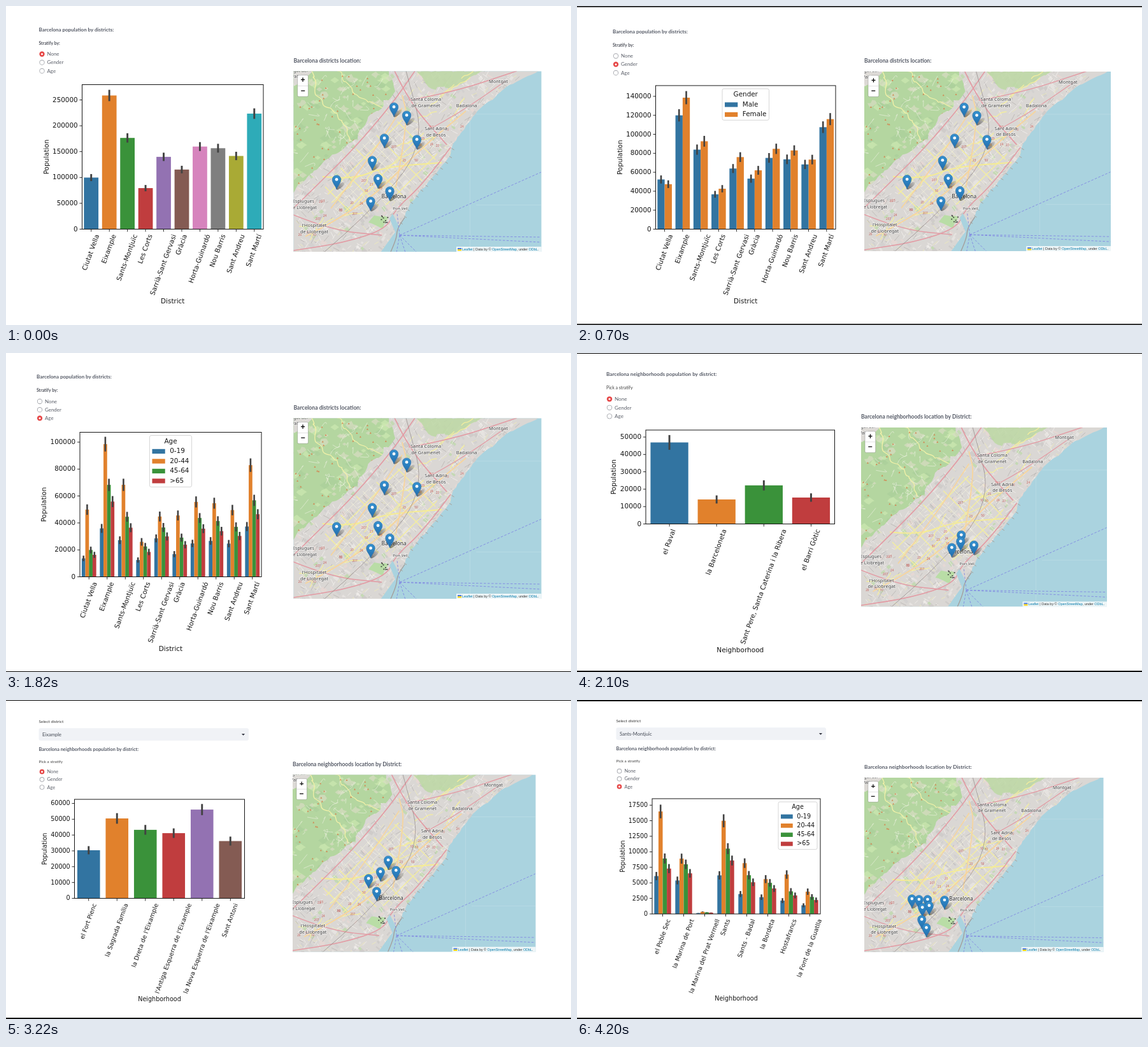
An HTML page with a canvas that plays this animation: 887 px wide and 501 px high, repeating every 4.9 s.

```html
<!DOCTYPE html>
<html lang="en">
<head>
<meta charset="utf-8">
<title>Barcelona population</title>
<style>
html, body { margin: 0; width: 100%; height: 100%; overflow: hidden; background: #fff; }
canvas { display: block; width: 887px; height: 501px; }
</style>
</head>
<body>
<canvas id="stage" width="887" height="501"></canvas>
<script>
const ctx = document.getElementById('stage').getContext('2d');
const HOLD = 700;
const PALETTE = ['#3274a1', '#e1812c', '#3a923a', '#c03d3e', '#9372b2',
  '#845b53', '#d684bd', '#7f7f7f', '#a9aa35', '#2eabb8'];
const PLOT = '"DejaVu Sans", sans-serif';
const PAGE = 'Lato, sans-serif';
const MAP = '"Noto Sans", sans-serif';
const ARIAL = '"Liberation Sans", Arial, sans-serif';
const INK = '#161616';
const STRATA = ['None', 'Gender', 'Age'];
const HUES = [[''], ['Male', 'Female'], ['0-19', '20-44', '45-64', '>65']];

// Total in thousands, then the shares of ages 0-19, ages 20-44 and women.
const place = (name, total, young = .15, adult = .36, women = .54) => ({ name, total, young, adult, women });

function split({ total, young, adult, women }, by) {
  const rest = 1 - young - adult;
  const shares = [[1], [1 - women, women], [young, adult, rest * .55, rest * .45]][by];
  return shares.map(share => share * total);
}

const districts = [
  place('Ciutat Vella', 99.8, .137, .5, .475),
  place('Eixample', 258.6, .139, .381, .536),
  place('Sants-Montjuïc', 176.5, .154, .387, .525),
  place('Les Corts', 79.4, .157, .327, .537),
  place('Sarrià-Sant Gervasi', 139.9, .204, .32, .543),
  place('Gràcia', 115.3, .146, .395, .538),
  place('Horta-Guinardó', 159.8, .155, .348, .53),
  place('Nou Barris', 156.6, .17, .349, .53),
  place('Sant Andreu', 141.6, .174, .35, .518),
  place('Sant Martí', 223.5, .167, .371, .519)
];
const districtPins = [[609, 159], [629, 172], [594, 208], [645, 210], [575, 243], [519, 273],
  [584, 271.5], [602.5, 291], [572.5, 307]];

// `unit` is the height in pixels of one tick step; `spread` sets the error bars.
const districtScene = { places: districts, pins: districtPins, font: 10.4, size: 7.95, legend: .5 };
const hoodScene = { hood: true, font: 9.6, size: 7.35, spread: .47 };
const scenes = [
  { ...districtScene, by: 0, x: 51.5, title: 37.5, box: [119.5, 123.5, 404, 350.5],
    step: 50, unit: 40.6, spread: .68, map: [451.5, 102.5, 389] },
  { ...districtScene, by: 1, x: 56, title: 40.5, box: [123.5, 125, 406, 350.5],
    step: 20, unit: 29.8, spread: .59, map: [451, 103, 387], edges: ['#333', 2, 2] },
  { ...districtScene, by: 2, x: 48, title: 38, box: [116, 124.5, 401, 351.5],
    step: 20, unit: 42.3, spread: .55, map: [451.5, 102.5, 389], edges: ['#000', 0, 1] },
  { ...hoodScene, by: 0, x: 46, title: 33.5, size: 8.13, box: [108, 121, 404.5, 268.5], font: 10.5,
    step: 10, unit: 27.3, spread: .62, map: [446, 117, 386], edges: ['#000', 1, 2],
    places: [place('el Raval', 46.9), place('la Barceloneta', 14.1),
      place('Sant Pere, Santa Caterina i la Ribera', 22.2), place('el Barri Gòtic', 15.2)],
    pins: [[610, 273], [609, 283], [595, 293], [630, 289]] },
  { ...hoodScene, by: 0, x: 51.5, title: 77.5, select: 'Eixample', box: [107.5, 156, 374.5, 311.5],
    step: 10, unit: 24.85, map: [450, 117.5, 381.5], edges: ['#000', 1, 2],
    places: [place('el Fort Pienc', 30.4), place('la Sagrada Família', 50.5), place("la Dreta de l'Eixample", 43.3),
      place("l'Antiga Esquerra de l'Eixample", 41.2), place("la Nova Esquerra de l'Eixample", 56.1),
      place('Sant Antoni', 36.2)],
    pins: [[604.5, 239.5], [592, 258], [617, 256], [573, 269], [586, 289.5]] },
  { ...hoodScene, by: 1, x: 53.5, title: 71.5, select: 'Gràcia', box: [110, 153.5, 378.5, 289], legend: 0,
    step: 5, unit: 22.4, map: [448, 120, 379.7], edges: ['#000', 0, 0, 1],
    places: [place('Vallcarca i els Penitents', 15.3), place("el Camp d'en Grassot i Gràcia Nova", 33.4),
      place('el Coll', 7.15), place('la Salut', 12.9), place('la Vila de Gràcia', 49.4)],
    pins: [[687, 157], [551.5, 215], [577, 242], [593, 239]] },
  { ...hoodScene, by: 2, x: 61.5, title: 76.5, select: 'Sants-Montjuïc', box: [118, 155, 382, 336], legend: 1,
    step: 2.5, unit: 24.4, spread: .27, map: [451, 122, 375.5], edges: ['#000', 2, 2],
    places: [place('el Poble Sec', 38.8, .157, .425), place('la Marina de Port', 28.8, .187, .309),
      place('la Marina del Prat Vermell', .95), place('Sants', 40.3, .154, .372), place('Sants - Badal', 22.7, .141),
      place('la Bordeta', 17.4, .155, .322), place('Hostafrancs', 15.1, .142, .42), place('la Font de la Guatlla', 9.95, .14)],
    pins: [[529, 300], [540.5, 301], [554.5, 301], [582, 302], [546, 314], [557, 311], [545, 333.5], [552.5, 347]] }
];

function rect(x, y, w, h, color) {
  ctx.fillStyle = color;
  ctx.fillRect(x, y, w, h);
}

function panel(x, y, w, h, r, fill, line) {
  ctx.beginPath();
  ctx.roundRect(x, y, w, h, r);
  ctx.fillStyle = fill;
  ctx.fill();
  if (line) { ctx.strokeStyle = line; ctx.lineWidth = .8; ctx.stroke(); }
}

function setFont(size, family, weight = 400) {
  ctx.font = `${weight} ${size}px ${family}`;
}

function text(str, x, y, size, family, color = INK, align = 'left', weight) {
  setFont(size, family, weight);
  ctx.fillStyle = color;
  ctx.textAlign = align;
  ctx.textBaseline = 'middle';
  ctx.fillText(str, x, y);
}

function turnedText(str, x, y, angle, size) {
  ctx.save();
  ctx.translate(x, y);
  ctx.rotate(-angle);
  text(str, 0, 0, size, PLOT, INK, 'center');
  ctx.restore();
}

function disc(x, y, r, color) {
  ctx.beginPath();
  ctx.arc(x, y, r, 0, 7);
  ctx.fillStyle = color;
  ctx.fill();
}

function trace(points) {
  ctx.beginPath();
  points.forEach(([x, y]) => ctx.lineTo(x, y));
}

function road(points, color, width) {
  ctx.beginPath();
  ctx.moveTo(...points[0]);
  points.slice(1, -1).forEach(([x, y], i) => {
    const [nx, ny] = points[i + 2];
    ctx.quadraticCurveTo(x, y, (x + nx) / 2, (y + ny) / 2);
  });
  ctx.lineTo(...points[points.length - 1]);
  ctx.strokeStyle = color;
  ctx.lineWidth = width;
  ctx.stroke();
}

function area(points, color) {
  trace(points);
  ctx.fillStyle = color;
  ctx.fill();
}

function inside(points, draw) {
  ctx.save();
  trace(points);
  ctx.clip();
  draw();
  ctx.restore();
}

function randomizer(seed) {
  return (lo = 0, hi = 1) => {
    seed = (seed * 1664525 + 1013904223) % 4294967296;
    return lo + (hi - lo) * seed / 4294967296;
  };
}

// Breaks each segment of a line into small jittered steps.
function rough(points, amount, seed) {
  const rnd = randomizer(seed);
  return points.flatMap(([x, y], i) => {
    const [nx, ny] = points[i + 1] || [x, y];
    const n = Math.max(1, Math.round(Math.hypot(nx - x, ny - y) / 6));
    return Array.from({ length: n }, (_, k) => {
      const j = k ? amount : 0;
      return [x + (nx - x) * k / n + rnd(-j, j), y + (ny - y) * k / n + rnd(-j, j)];
    });
  });
}

function drawControls({ x, title, size, by, select, hood }) {
  if (select) {
    const y = title - 33.3, w = 329.5, caret = x + w - 8.5;
    text('Select district', x, title - 43, 6.5, PAGE, '#333');
    panel(x, y, w, 19.5, 3, '#f0f2f6');
    text(select, x + 5.5, y + 10, 7.6, PAGE, '#444a55');
    area([[caret - 2.6, y + 8.7], [caret + 2.6, y + 8.7], [caret, y + 11.6]], '#31333f');
  }
  const heading = hood ? 'Barcelona neighborhoods population by district:' : 'Barcelona population by districts:';
  text(heading, x, title, size, PAGE, '#555a66', 'left', 700);
  const subY = title + 2.64 * size;
  if (hood) text('Pick a stratify', x, subY, size * .86, PAGE, '#444');
  else text('Stratify by:', x, subY, size * .86, PAGE, '#50535c', 'left', 700);
  STRATA.forEach((name, i) => {
    const y = title + size * (4.78 + 1.66 * i), r = size * .52, on = i === by;
    disc(x + 5, y, r, on ? '#e64848' : '#a2a4aa');
    disc(x + 5, y, on ? 1.5 : r - .9, '#fff');
    text(name, x + 13, y + .3, size, PAGE, '#5c606a');
  });
}

function drawLegend({ legend, by, font, box: [left, top, right] }) {
  const hues = HUES[by];
  setFont(font, PLOT);
  const w = font * 3.45 + Math.max(...hues.map(hue => ctx.measureText(hue).width));
  const h = font * (1.7 + 1.52 * hues.length);
  const x = left + 5 + legend * (right - left - 10 - w), y = top + 5;
  panel(x, y, w, h, 2.5, 'rgba(255,255,255,.9)', '#ccc');
  text(STRATA[by], x + w / 2, y + font * .9, font, PLOT, INK, 'center');
  hues.forEach((hue, i) => {
    const cy = y + font * (2.4 + 1.49 * i);
    rect(x + 4, cy - font * .35, font * 1.95, font * .7, PALETTE[i]);
    text(hue, x + font * 3.05, cy, font, PLOT);
  });
}

function drawChart(s) {
  const [left, top, right, bottom] = s.box, { font, places, by } = s;
  const count = HUES[by].length;
  const slot = (right - left) / places.length, bar = slot * .8 / count;
  const scale = s.unit / s.step, lw = by ? 2.6 : 2.9;
  const tilt = 70 * Math.PI / 180;
  let labelsEnd = 0;

  places.forEach((p, group) => {
    const start = left + slot * (group + .1), mid = left + slot * (group + .5);
    split(p, by).forEach((v, k) => {
      const x = start + bar * k, err = s.spread * Math.sqrt(v) * Math.min(1, v);
      rect(x, bottom - v * scale, bar, v * scale, PALETTE[by ? k : group]);
      rect(x + bar / 2 - lw / 2, bottom - (v + err) * scale, lw, 2 * err * scale, '#424242');
    });
    rect(mid - .45, bottom, .9, 4, INK);
    setFont(font, PLOT);
    const tall = ctx.measureText(p.name).width * Math.sin(tilt) + font * Math.cos(tilt);
    turnedText(p.name, mid, bottom + 7 + tall / 2, tilt, font);
    labelsEnd = Math.max(labelsEnd, bottom + 7 + tall);
  });

  ctx.strokeStyle = INK;
  ctx.lineWidth = 1;
  ctx.strokeRect(left, top, right - left, bottom - top);
  let tickWidth = 0;
  for (let i = 0; i * s.unit < bottom - top; i++) {
    const y = bottom - i * s.unit, label = String(i * s.step * 1000);
    rect(left - 4, y - .45, 4, .9, INK);
    text(label, left - 6.8, y + .4, font, PLOT, INK, 'right');
    tickWidth = Math.max(tickWidth, ctx.measureText(label).width);
  }
  turnedText('Population', left - tickWidth - 6.8 - font * .88, (top + bottom) / 2, Math.PI / 2, font);
  text(s.hood ? 'Neighborhood' : 'District', (left + right) / 2, labelsEnd + font * .8, font, PLOT, INK, 'center');
  if (by) drawLegend(s);
}

const COAST = [[836, 102], [790, 124], [740, 165], [702, 216], [697, 236], [668, 271], [636, 308], [617, 346]];
const LAND = [...rough(COAST, 1.1, 3), [607, 326], [602, 334], [611, 355], [588, 387], [451, 387], [451, 102]];
const FOREST = [...rough([[601, 102], [611, 134], [567, 180], [552, 208], [508, 238], [472, 270], [451, 294]], 3, 8), [451, 102]];
const HILLS = rough([[644, 102], [750, 102], [701, 128], [668, 130], [644, 102]], 2.5, 4);

function drawCity() {
  const rnd = randomizer(11);
  const tones = ['#cfccca', '#e6e3e0', '#d3d1d0', '#e5d8d4', '#c4d9b4'];
  rect(451, 102, 390, 285, '#dad7d4');
  for (let i = 0; i < 620; i++) {
    ctx.save();
    ctx.translate(rnd(451, 800), rnd(102, 387));
    ctx.rotate(Math.PI / 4 + rnd(-.3, .3));
    rect(0, 0, rnd(2, 9), rnd(2, 7), tones[Math.floor(rnd(0, 4.5))]);
    ctx.restore();
  }
  for (let i = 0; i < 1200; i++) {
    const x = rnd(451, 800), y = rnd(102, 387), d = rnd(3, 12);
    const a = (rnd() < .5 ? .78 : -.78) + rnd(-.35, .35);
    const color = ['#f6f4f1', '#f6f4f1', '#b3afad', '#f3efb4'][Math.floor(rnd(0, 3.6))];
    road([[x, y], [x + d * Math.cos(a), y + d * Math.sin(a)]], color, .7);
  }
  area(rough([[569, 340], [578, 329], [600, 332], [592, 350], [569, 340]], 1.5, 2), '#b9dda6');
  for (let i = 0; i < 9; i++) rect(rnd(586, 600), rnd(328, 340), 2, 1.6, '#444');
  area(HILLS, 'rgba(190,217,165,.85)');
}

function drawForest() {
  const rnd = randomizer(5);
  const tones = ['rgba(205,232,177,.7)', 'rgba(172,208,155,.8)', 'rgba(222,222,200,.6)'];
  rect(451, 102, 170, 195, '#b4d6a0');
  for (let i = 0; i < 110; i++) {
    const x = rnd(451, 612), y = rnd(102, 288), r = rnd(3, 10);
    area(rough([[x - r, y], [x, y - r * .7], [x + r, y], [x, y + r * .7], [x - r, y]], 2.5, i), tones[i % 3]);
  }
  area([[451, 102], [482, 102], [462, 121], [451, 126]], '#dcd9d5');
  for (let i = 0; i < 55; i++) {
    const x = rnd(451, 605), y = rnd(102, 275);
    road([[x, y], [x + rnd(-9, 9), y + rnd(-9, 9)], [x + rnd(-16, 16), y + rnd(-16, 16)]], 'rgba(245,245,232,.8)', .7);
  }
  road(rough([[480, 102], [486, 140], [510, 160], [528, 180], [540, 212]], 5, 6), '#f4f2a8', 1.3);
  road(rough([[520, 102], [552, 140], [592, 160]], 4, 9), '#f4f2a8', 1.2);
  for (let i = 0; i < 52; i++) {
    const x = rnd(453, 604), y = rnd(106, 280);
    area([[x - 1.5, y + 1.3], [x + 1.5, y + 1.3], [x, y - 1.4]], '#d08a55');
  }
}

function drawRoads() {
  inside([[500, 285], [552, 222], [620, 178], [682, 215], [668, 262], [612, 310], [520, 325]], () => {
    for (let i = -11; i <= 11; i++) {
      const c = i * 9, color = i % 3 ? '#f5f3dc' : '#f4ee9e', w = i % 3 ? .7 : 1.4;
      road([[490 + c, 365 + c], [690 + c, 165 + c]], color, w);
      road([[490 + c, 165 - c], [690 + c, 365 - c]], color, w);
    }
  });
  const rnd = randomizer(31);
  for (let i = 0; i < 16; i++) {
    const x = 460 + i * 17, y = 375 - i * 15 + rnd(-45, 20);
    road(rough([[x, y], [x + rnd(20, 50), y - rnd(0, 45)]], 2.5, i), '#f4ee9e', 1.3);
  }
  const orange = '#f7d59d', pink = '#e39aa3';
  road([[497, 268], [545, 273], [592, 253], [684, 246]], '#f5ec93', 2);
  road([[470, 362], [562, 315], [650, 225], [722, 165]], orange, 1.9);
  road([[612, 284], [632, 180], [622, 140]], orange, 1.8);
  road([[510, 318], [570, 240], [622, 160]], orange, 1.6);
  road([[451, 318], [498, 272], [548, 222], [606, 154], [642, 102]], pink, 1.6);
  road([[610, 102], [632, 150], [692, 218]], pink, 1.7);
  road([[698, 222], [656, 279], [610, 320], [598, 350], [530, 372], [451, 384]], pink, 1.6);
  road([[632, 148], [700, 136], [802, 102]], pink, 1.4);
  road([[451, 328], [510, 352], [590, 360]], pink, 1.4);
  road([[664, 194], [712, 168], [784, 118]], pink, 1.2);
  road([[500, 386], [566, 330], [660, 220], [628, 102]], '#99918f', .8);
  for (let i = 0; i < 30; i++) {
    const x = 460 + i * 8 + rnd(-25, 25), y = 365 - i * 6 + rnd(-30, 20);
    text(['20', '23', '50', '207', '10', '24'][i % 6], x, y, 4.6, MAP, '#c65c58', 'center');
  }
}

function drawSea() {
  const jetties = rough(COAST.slice(3), 1, 7);
  jetties.forEach(([x, y], i) => {
    if (i % 2) road([[x - 1, y], [x + 3, y + 2.5]], '#a9a29a', 1);
  });
  road([[604, 386], [613, 366], [614, 350], [626, 332]], '#a39c98', 1.3);
  ctx.globalAlpha = .22;
  rect(728, 180, .7, 207, '#fff');
  for (const y of [169.5, 312]) rect(738, y, 103, .7, '#fff');
  ctx.globalAlpha = 1;
  ctx.setLineDash([3.6, 2.4]);
  [[840, 261], [840, 363], [840, 371], [645, 387], [627, 387], [613, 387], [614, 326]]
    .forEach(end => road([[618, 360], end], '#8188e2', .9));
  ctx.setLineDash([]);
}

function mapLabel(str, x, y, size = 7.4, color = '#3d3d3d') {
  setFont(size, MAP);
  ctx.textAlign = 'center';
  ctx.textBaseline = 'middle';
  ctx.strokeStyle = 'rgba(255,255,255,.65)';
  ctx.lineWidth = 1.6;
  ctx.lineJoin = 'round';
  str.split('\n').forEach((line, i) => {
    ctx.strokeText(line, x, y + i * 9.7);
    text(line, x, y + i * 9.7, size, MAP, color, 'center');
  });
}

function drawLabels() {
  mapLabel('Montgat', 773, 119);
  mapLabel('Santa Coloma\nde Gramenet', 659, 147);
  mapLabel('Badalona', 723, 156.5);
  mapLabel('Sant Adrià\nde Besòs', 675, 192.7);
  mapLabel('Barcelona', 609, 300, 8.3, '#222');
  mapLabel('Port Vell', 619, 318.5, 6);
  mapLabel('Esplugues\nde Llobregat', 467, 307, 7);
  mapLabel("l'Hospitalet\nde Llobregat", 484, 345);
  mapLabel('Cugat del\nVallès', 458, 101.5, 7);
}

function drawMapControls() {
  panel(457.6, 108.6, 16.8, 33.6, 2, '#fff', 'rgba(0,0,0,.25)');
  rect(458, 125.2, 16, .6, '#ccc');
  text('+', 466, 117, 12, ARIAL, '#111', 'center', 700);
  text('−', 466, 133.4, 12, ARIAL, '#111', 'center', 700);
  rect(707, 378, 134, 9, 'rgba(255,255,255,.8)');
  rect(709, 380, 6, 2.2, '#4c7be1');
  rect(709, 382.2, 6, 2.2, '#ffd500');
  let x = 716;
  ['Leaflet', ' | Data by © ', 'OpenStreetMap', ', under ', 'ODbL', '.'].forEach((part, i) => {
    text(part, x, 382.6, 5.5, ARIAL, i % 2 ? '#333' : '#0078a8');
    x += ctx.measureText(part).width;
  });
}

function drawPin([x, y]) {
  ctx.save();
  ctx.translate(x, y);
  ctx.save();
  ctx.translate(6, 9.5);
  ctx.rotate(-.72);
  const shade = ctx.createLinearGradient(-9, 0, 9, 0);
  shade.addColorStop(0, 'rgba(0,0,0,.5)');
  shade.addColorStop(1, 'rgba(0,0,0,.08)');
  ctx.beginPath();
  ctx.ellipse(0, 0, 8.5, 3, 0, 0, 7);
  ctx.fillStyle = shade;
  ctx.fill();
  ctx.restore();
  const blue = ctx.createLinearGradient(0, -7, 0, 14);
  blue.addColorStop(0, '#3591d0');
  blue.addColorStop(1, '#236fae');
  ctx.beginPath();
  ctx.moveTo(0, 14.6);
  ctx.bezierCurveTo(-2, 9, -6.7, 5, -6.7, -.4);
  ctx.arc(0, -.4, 6.7, Math.PI, 0);
  ctx.bezierCurveTo(6.7, 5, 2, 9, 0, 14.6);
  ctx.fillStyle = blue;
  ctx.fill();
  ctx.strokeStyle = '#2a6fa6';
  ctx.lineWidth = .7;
  ctx.stroke();
  disc(0, -.6, 2.4, '#fff');
  ctx.restore();
}

function drawMap({ map: [x, y, w], hood, pins }) {
  const scale = w / 389;
  const heading = hood ? 'Barcelona neighborhoods location by District:' : 'Barcelona districts location:';
  text(heading, x, y - 16.2, 8.62 * scale, PAGE, '#555a66', 'left', 700);
  ctx.save();
  ctx.translate(x, y);
  ctx.scale(scale, scale);
  ctx.translate(-451.5, -102.5);
  ctx.beginPath();
  ctx.rect(451.5, 102.5, 389, 283.5);
  ctx.clip();
  rect(451, 102, 390, 285, '#aad3df');
  inside(LAND, () => {
    drawCity();
    inside(FOREST, drawForest);
    drawRoads();
  });
  drawSea();
  drawLabels();
  pins.forEach(drawPin);
  drawMapControls();
  ctx.restore();
}

function drawEdges([color, top, bottom, right = 0]) {
  rect(0, 0, 887, top, color);
  rect(0, 501 - bottom, 887, bottom, color);
  rect(887 - right, 0, right, 501, color);
}

function drawScene(s) {
  rect(0, 0, 887, 501, '#fff');
  drawControls(s);
  drawChart(s);
  drawMap(s);
  if (s.edges) drawEdges(s.edges);
}

let shown = -1;
function tick() {
  const index = Math.floor(performance.now() / HOLD) % scenes.length;
  if (index !== shown) drawScene(scenes[shown = index]);
  requestAnimationFrame(tick);
}
tick();
</script>
</body>
</html>
```
